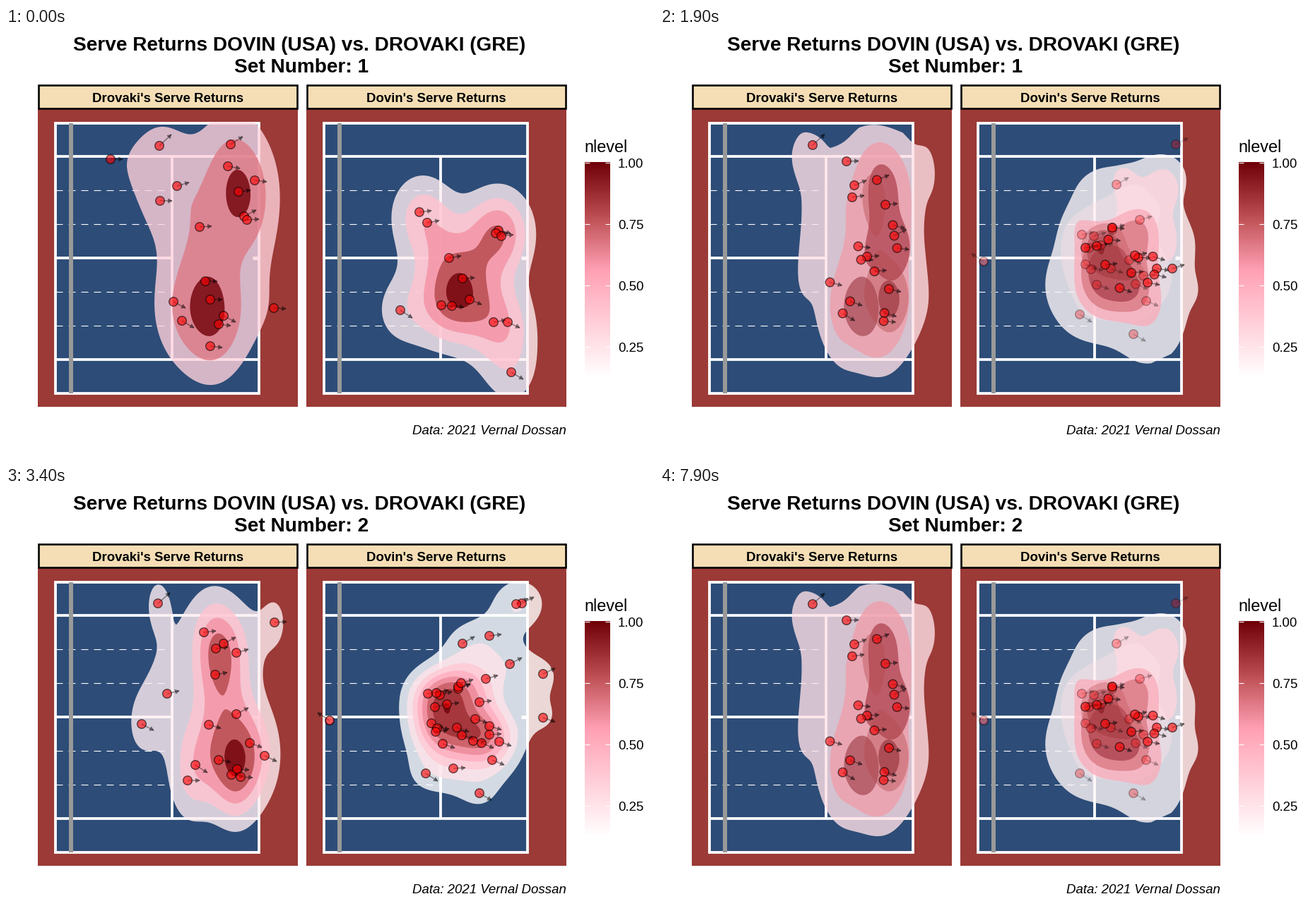
These frames come from a looping animation (917 px wide and 611 px high, 8000 ms). A matplotlib script:

```python
import numpy as np
import matplotlib.pyplot as plt
from matplotlib.animation import FuncAnimation
from matplotlib.collections import LineCollection, PolyCollection
from matplotlib.colors import LinearSegmentedColormap
from matplotlib.patches import Polygon, Rectangle

W, H, DPI = 917, 611, 100
PX = 72 / DPI                      # points per pixel
FRAMES, STEPS, HOLD = 80, 30, 5
SHIFT = 380                        # distance between the two panels
X_RANGE, Y_RANGE = (61.7, 396.3), (134.2, 517.8)
X_SCALE, Y_SCALE = 265 / 11.885, 383.6 / 10.97   # pixels per metre
LEVEL = 0.005 / (X_SCALE * Y_SCALE)              # density step per square pixel
FILL_ALPHA, POINT_ALPHA, ARROW_ALPHA = 0.8, 0.6, 0.4
REACH = 17                         # horizontal arrow length
N = 360                            # vertices per tweened outline

CMAP = LinearSegmentedColormap.from_list("nlevel", [
    (0, "white"), (0.5, "#ffa0b4"), (0.75, "#bc4e52"), (1, "#700008")])

# x, y, arrow dy in set 1, then the same in set 2
LEFT = np.array([
    (217, 167, -16, 215, 165, -15), (318, 165, -11, 296, 266, -3),
    (148, 186, 0, 380, 192, -1), (314, 196, 3, 345, 363, 6),
    (352, 216, 2, 319, 408, 2), (242, 224, -5, 308, 222, -9),
    (329, 232, -2, 257, 416, 0), (218, 245, 0, 326, 235, -5),
    (337, 267, -9, 326, 322, -9), (341, 272, -1, 297, 229, -2),
    (274, 282, -1, 287, 337, 5), (282, 359, 0, 366, 381, 8),
    (289, 385, 0, 192, 336, 9), (237, 388, 9, 301, 387, 3),
    (249, 415, 10, 268, 394, 11), (308, 408, 9, 327, 400, 1),
    (301, 420, 2, 332, 411, 1), (289, 451, 2, 280, 206, -2),
    (379, 397, 1, 228, 293, -4)], float)
RIGHT = np.array([
    (585, 261, -2, 684, 339, 5), (596, 276, -3, 608, 347, -2),
    (697, 287, 4, 698, 361, 6), (693, 291, 0, 661, 360, 1),
    (701, 295, -2, 633, 399, -1), (627, 326, -3, 609, 292, -4),
    (646, 355, -1, 760, 327, 6), (656, 385, 7, 645, 352, 5),
    (616, 393, 2, 644, 278, -5), (631, 394, 2, 713, 251, -9),
    (558, 400, 11, 722, 166, -8), (690, 417, -3, 760, 265, -8),
    (710, 417, 8, 670, 305, -2), (715, 488, 10, 684, 211, -2)], float)
# points that exist only in set 2: x, y, arrow dy
ENTER = np.array([
    (458, 331, -11), (730, 165, -9), (646, 222, -10), (679, 272, -5),
    (640, 286, -6), (640, 283, -4), (597, 293, -3), (614, 295, -5),
    (624, 308, -2), (607, 312, -4), (664, 329, 5), (602, 335, 6),
    (638, 341, 6), (610, 342, 1), (684, 351, -1), (673, 363, 7),
    (618, 364, 6), (688, 387, 7), (594, 406, 11), (670, 434, 10)], float)

fig = plt.figure(figsize=(W / DPI, H / DPI), dpi=DPI, facecolor="white")
ax = fig.add_axes([0, 0, 1, 1])


def bandwidth(v):
    iqr = np.subtract(*np.percentile(v, [75, 25]))
    return 1.06 * min(v.std(ddof=1), iqr / 1.34) * len(v) ** -0.2


def density(pts, shift):
    """Gaussian kernel density on a 100 x 100 grid over one panel."""
    gx = np.linspace(*X_RANGE, 100) + shift
    gy = np.linspace(*Y_RANGE, 100)
    sx, sy = bandwidth(pts[:, 0]), bandwidth(pts[:, 1])
    kx = np.exp(-0.5 * ((gx[:, None] - pts[:, 0]) / sx) ** 2)
    ky = np.exp(-0.5 * ((gy[:, None] - pts[:, 1]) / sy) ** 2)
    return gx, gy, ky @ kx.T / (2 * np.pi * sx * sy * len(pts))


def resample(seg):
    """Closed outline with N evenly spaced vertices and fixed orientation."""
    ring = np.vstack([seg, seg[:1]])
    d = np.r_[0, np.cumsum(np.hypot(*np.diff(ring, axis=0).T))]
    at = np.linspace(0, d[-1], N, endpoint=False)
    out = np.column_stack([np.interp(at, d, ring[:, k]) for k in (0, 1)])
    x, y = out.T
    area = np.sum(x * np.roll(y, -1) - y * np.roll(x, -1))
    return out if area > 0 else out[::-1]


def outlines(pts, shift, top):
    """Map (level, piece) to its outline and fill colour."""
    cs = ax.contour(*density(pts, shift), levels=LEVEL * np.arange(1, top + 1))
    segs = cs.allsegs
    cs.remove()
    shapes = {}
    for k, pieces in enumerate(segs, 1):
        color = np.array(CMAP((k / top - 0.125) / 0.875)[:3])
        pieces = sorted((s for s in pieces if len(s) > 3), key=lambda s: s[:, 1].min())
        for j, seg in enumerate(pieces):
            shapes[k, j] = resample(seg), color
    return shapes


def align(a, b):
    """Rotate the vertex order of b to lie closest to a."""
    cost = [np.sum((a - np.roll(b, r, axis=0)) ** 2) for r in range(N)]
    return np.roll(b, int(np.argmin(cost)), axis=0)


class Shape:
    """One density outline that morphs, or fades where it has no partner."""

    def __init__(self, start, end):
        self.a0, self.a1 = (FILL_ALPHA if s else 0 for s in (start, end))
        self.p0, self.c0 = start or end
        self.p1, self.c1 = end or start
        if start and end:
            self.p1 = align(self.p0, self.p1)
        self.patch = ax.add_patch(Polygon(self.p0, closed=True, lw=0, zorder=3))

    def show(self, t):
        self.patch.set_xy(mix(self.p0, self.p1, t))
        self.patch.set_facecolor((*mix(self.c0, self.c1, t), mix(self.a0, self.a1, t)))


def mix(a, b, t):
    return a + (b - a) * t


def line(x, y, width, color="white", z=1, **kw):
    ax.plot(x, y, color=color, lw=width * PX, solid_capstyle="butt",
            dash_capstyle="butt", zorder=z, **kw)


def box(x0, y0, x1, y1, fill, edge="none", width=0, z=0.5):
    ax.add_patch(Rectangle((x0, y0), x1 - x0, y1 - y0, fc=fill, ec=edge,
                           lw=width * PX, joinstyle="miter", zorder=z))


def label(x, y, s, size, ha="left", **kw):
    return ax.text(x, y, s, fontsize=size * PX, family="Liberation Sans", ha=ha,
                   va="baseline", color="black", zorder=6, **kw)


def panel(dx, title):
    box(45 + dx, 115, 413 + dx, 537, "#9b3a37", z=0.2)
    box(46.2 + dx, 80.7, 411.8 + dx, 114, "#f5deb5", "black", 2.6)
    label(229 + dx, 104.6, title, 18.67, "center", weight="bold")
    box(70 + dx, 134.5, 357.5 + dx, 517.8, "#2d4c77", "white", 3.8)
    for y in (230, 278, 374, 422):
        line([70 + dx, 235 + dx], [y, y], 1.1, linestyle=(0, (10 / 1.1, 8 / 1.1)))
    for y in (182.2, 470):
        line([70 + dx, 359 + dx], [y, y], 3.8)
    line([235 + dx] * 2, [182, 470], 3.8)
    line([70 + dx, 235 + dx], [326.2] * 2, 3.8)
    line([348.5 + dx, 357 + dx], [326.2] * 2, 5)
    line([92 + dx] * 2, [134.5, 518], 6, "#999999", 2)


def legend():
    y0, span = 191, 348
    bottom = y0 + 0.875 * span
    ax.imshow(CMAP(np.linspace(1, 0, 256))[:, None, :3], extent=(819, 855, bottom, y0),
              aspect="auto", interpolation="bilinear", zorder=1)
    label(818, 176.5, "nlevel", 23.33)
    for v in (1, 0.75, 0.5, 0.25):
        y = y0 + (1 - v) * span
        label(866, y + 6.7, f"{v:.2f}", 18.67)
        for x in (819, 848):
            line([x, x + 7], [y, y], 1.1, z=2)


def progress(i):
    if i < HOLD + STEPS:
        return max(0, i - HOLD + 1) / STEPS
    return 1 - max(0, i - 2 * STEPS - HOLD + 1) / STEPS


sets = [(LEFT[:, :2], LEFT[:, 3:5], 0, 3, 5),
        (RIGHT[:, :2], np.vstack([RIGHT[:, 3:5], ENTER[:, :2]]), SHIFT, 5, 8)]
shapes = []
for p0, p1, dx, top0, top1 in sets:
    first, last = outlines(p0, dx, top0), outlines(p1, dx, top1)
    shapes += [Shape(first.get(k), last.get(k)) for k in sorted({*first, *last})]

panel(0, "Drovaki's Serve Returns")
panel(SHIFT, "Dovin's Serve Returns")
legend()
label(415, 32, "Serve Returns DOVIN (USA) vs. DROVAKI (GRE)", 28, "center", weight="bold")
subtitle = label(418.5, 63, "", 28, "center", weight="bold")
label(793, 575.5, "Data: 2021 Vernal Dossan", 18.67, "right", style="italic")

moving = np.vstack([LEFT, RIGHT])
start = np.vstack([ENTER, moving[:, :3]])
end = np.vstack([ENTER, moving[:, 3:]])
reach = np.full(len(start), float(REACH))
reach[0] = -REACH
born = np.arange(len(start)) < len(ENTER)

shafts = ax.add_collection(LineCollection([], linewidths=1.5 * PX, capstyle="butt", zorder=4))
heads = ax.add_collection(PolyCollection([], linewidths=0.8 * PX, zorder=4))
dots = ax.scatter(start[:, 0], start[:, 1], s=(12.6 * PX) ** 2,
                  linewidths=1.4 * PX, zorder=5)

ax.set_xlim(0, W)
ax.set_ylim(H, 0)
ax.axis("off")


def rgba(rgb, alpha):
    return np.column_stack([np.tile(rgb, (len(alpha), 1)), alpha])


def update(i):
    t = progress(i)
    for s in shapes:
        s.show(t)
    now = mix(start, end, t)
    pos = now[:, :2]
    vec = np.column_stack([reach, now[:, 2]])
    tip = pos + vec
    u = vec / np.hypot(*vec.T)[:, None]
    n = u[:, ::-1] * (-1, 1)
    back = tip - 5.4 * u
    fade = np.where(born, t, 1.0)
    ink = rgba((0, 0, 0), fade * ARROW_ALPHA)
    shafts.set_segments(np.stack([pos, tip], axis=1))
    shafts.set_color(ink)
    heads.set_verts(np.stack([tip, back + 3 * n, back - 3 * n], axis=1))
    heads.set_facecolor(ink)
    heads.set_edgecolor(ink)
    dots.set_offsets(pos)
    dots.set_facecolor(rgba((1, 0, 0), fade * POINT_ALPHA))
    dots.set_edgecolor(rgba((0, 0, 0), fade * POINT_ALPHA))
    subtitle.set_text(f"Set Number: {1 if i < HOLD + STEPS // 2 else 2}")
    return []


anim = FuncAnimation(fig, update, frames=FRAMES, interval=100, repeat=True,
                     repeat_delay=0, blit=False)
plt.show()
```
